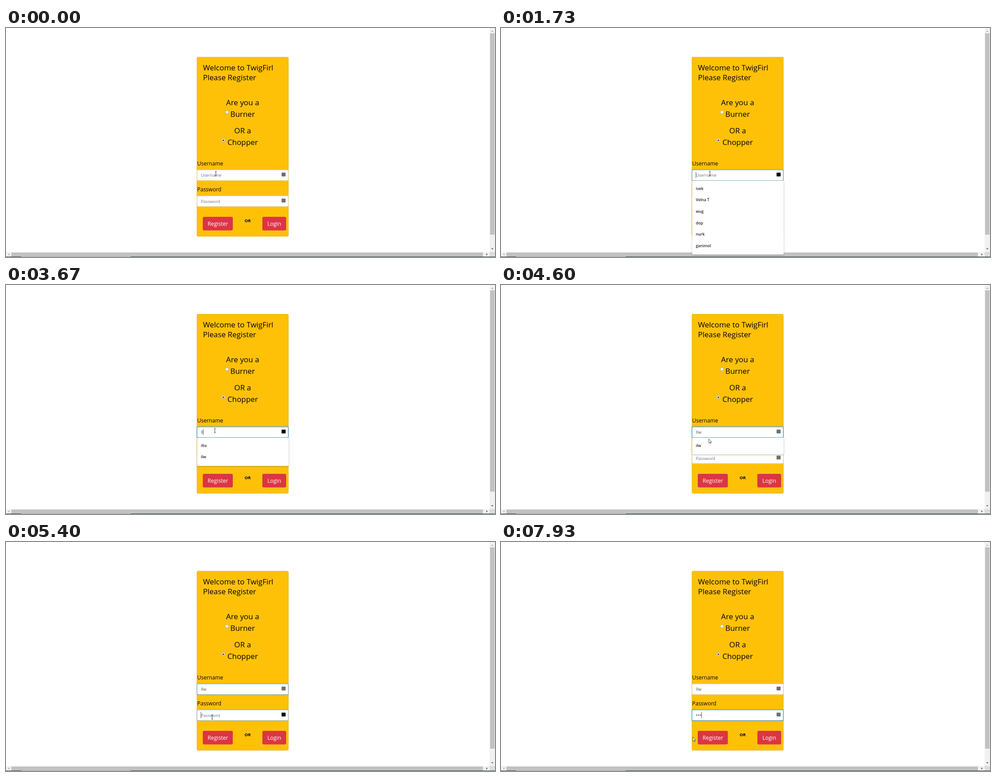
An HTML page for the animation above (8000 ms loop, 1091 by 513 pixels).

```html
<!DOCTYPE html>
<html lang="en">
<head>
<meta charset="utf-8">
<title>Register form</title>
<style>
  html, body { margin: 0; width: 100%; height: 100%; overflow: hidden; background: #fff; }
  svg { display: block; width: 100%; height: 100%; font-family: "Open Sans", "Noto Sans", sans-serif; }
  .big { font-size: 16.85px; }
  .mid { font-size: 12px; }
  .btn { font-size: 12.1px; fill: #fff; }
  .small { font-size: 9.55px; }
  .item { font-size: 8.6px; font-weight: 600; fill: #222; }
  .center { text-anchor: middle; }
</style>
</head>
<body>
<svg viewBox="0 0 1091 513">
  <defs>
    <filter id="shadow" x="-10%" y="-20%" width="120%" height="140%">
      <feDropShadow dx="0" dy="0.8" stdDeviation="0.9" flood-opacity="0.45"/>
    </filter>
    <linearGradient id="radio" x2="0" y2="1">
      <stop stop-color="#fff"/><stop offset="1" stop-color="#dedede"/>
    </linearGradient>
  </defs>

  <!-- scrollbars -->
  <path fill="#f1f1f1" d="M1079 0h12v502h-12zM0 502h1079v10H0z"/>
  <path fill="#dcdcdc" d="M1079 502h12v10h-12z"/>
  <path fill="#c1c1c1" d="M1080 12h10v451h-10zM12 503h1052v9H12z"/>
  <path fill="#a3a3a3" d="M1082.5 8.5h5l-2.5-2.7zM7.5 504.8v5l-2.7-2.5z"/>
  <path fill="#505050" d="M1082.5 493.5h5l-2.5 2.7zM1071.8 504.8v5l2.7-2.5z"/>
  <path fill="#2d4a48" d="M0 512h1091v1H0z"/>
  <path fill="#a9b1b0" d="M34 512h244v1H34z"/>

  <!-- card -->
  <rect x="426" y="65.3" width="204" height="401.4" rx="2.6" fill="#ffc107" stroke="#d9a512" stroke-width=".7"/>
  <g class="big">
    <text x="439.5" y="95.3">Welcome to TwigFirl</text>
    <text x="439.5" y="116.6">Please Register</text>
    <g class="center">
      <text x="528" y="173.3">Are you a</text>
      <text x="528" y="199.4">Burner</text>
      <text x="528" y="235.7">OR a</text>
      <text x="528" y="262">Chopper</text>
    </g>
  </g>
  <g fill="url(#radio)" stroke="#a0a0a0" stroke-width=".7">
    <circle cx="493" cy="189" r="3.7"/>
    <circle cx="485" cy="251.5" r="3.7"/>
  </g>
  <circle cx="485" cy="251.5" r="1.7" fill="#333"/>
  <text class="mid" x="426.5" y="307.7">Username</text>
  <text class="mid" x="426.5" y="365.8">Password</text>
  <g id="fields"></g>

  <g fill="#dc3545">
    <rect x="439" y="423" width="67" height="30.5" rx="3"/>
    <rect x="572" y="423" width="53" height="30.5" rx="3"/>
  </g>
  <text class="btn center" x="472.6" y="442.9">Register</text>
  <text class="btn center" x="598.5" y="442.9">Login</text>
  <text class="small center" x="539.2" y="434.6" font-weight="700">OR</text>

  <g id="menu">
    <rect id="panel" x="426.5" y="342" width="204.3" rx="2" fill="#fff" filter="url(#shadow)"/>
    <g id="items"></g>
  </g>

  <g id="pointer">
    <path id="arrow" d="M0 0V9.2L2.1 7.3L3.6 10.4L4.9 9.8L3.5 6.8H6.3Z" fill="#fff" stroke="#111" stroke-width=".7"/>
    <path id="beam" d="M-1.9-4.9H-.5L0-4.5L.5-4.9H1.9M0-4.5V4.5M-1.9 4.9H-.5L0 4.5L.5 4.9H1.9" fill="none" stroke="#222" stroke-width=".9"/>
  </g>
</svg>
<script>
const LOOP = 8000, FRAME_RATE = 15, TEXT_X = 434.8;
const byId = id => document.getElementById(id);

function add(parent, tag, attributes) {
  const node = document.createElementNS("http://www.w3.org/2000/svg", tag);
  for (const name in attributes) node.setAttribute(name, attributes[name]);
  return parent.appendChild(node);
}

function set(node, attributes) {
  for (const name in attributes) node.setAttribute(name, attributes[name]);
}

const show = (node, visible) => node.style.display = visible ? "" : "none";
const clamp = v => Math.max(0, Math.min(1, v));
const within = (t, from, to) => t >= from && t < to;

// Last entry of [time, value] pairs already reached.
const latest = (steps, t) => steps.filter(step => step[0] <= t).pop()[1];

function makeField(y, placeholder) {
  const group = byId("fields");
  return {
    y, placeholder,
    glow: add(group, "rect", { x: 424.8, y: y - 1.7, width: 206.4, height: 27, rx: 3.6, fill: "#007bff" }),
    box: add(group, "rect", { x: 426.4, y, width: 203.2, height: 23.6, rx: 2.4, fill: "#fff", "stroke-width": .8 }),
    ring: add(group, "rect", { x: 426.4, y, width: 203.2, height: 23.6, rx: 2.4, fill: "none", stroke: "#5aaed6", "stroke-width": 1 }),
    text: add(group, "text", { class: "small", x: TEXT_X, y: y + 15.3 }),
    icon: add(group, "rect", { x: 614.8, y: y + 6, width: 9, height: 8.6, rx: 1 }),
    caret: add(group, "rect", { y: y + 4.4, width: .8, height: 14, fill: "#333" })
  };
}

const username = makeField(318, "Username");
const password = makeField(376.2, "Password");
const items = Array.from({ length: 6 }, (_, i) =>
  add(byId("items"), "text", { class: "item", x: TEXT_X, y: 362.8 + i * 25.6 }));

const userText = [[0, ""], [2870, "I"], [3670, "Il"], [3870, "Ilw"]];
const passText = [[0, ""], [6270, "•"], [6530, "••"], [6870, "•••"]];
const suggestions = [
  [0, []],
  [1730, ["ivek", "Velna T", "wug", "dop", "nurk", "ganimol"]],
  [2930, ["ivek", "ilto", "ilw", "imro", "irvu", "isku"]],
  [3670, ["ilto", "ilw"]],
  [3870, ["ilw"]],
  [5330, []]
];
const path = [
  [0, 468, 327], [400, 482, 250], [600, 478, 265], [870, 467, 300], [930, 467, 306],
  [1000, 467, 306], [1270, 466, 326], [4530, 466, 326], [4730, 460, 377],
  [5070, 460, 392], [7330, 460, 392], [7730, 422, 432], [7930, 428, 437], [8000, 428, 437]
];

function pointerAt(t) {
  const i = path.findIndex(point => point[0] > t);
  const [t0, x0, y0] = path[i - 1], [t1, x1, y1] = path[i];
  const k = (t - t0) / (t1 - t0);
  return [x0 + (x1 - x0) * k, y0 + (y1 - y0) * k];
}

function drawField(field, value, focus, hovered, caretOn) {
  const secret = value.startsWith("•");
  field.text.textContent = value || field.placeholder;
  field.text.style.fontSize = secret ? "11.2px" : "";
  set(field.text, { fill: value ? "#495057" : "#6c757d", y: field.y + (secret ? 16 : 15.3) });
  set(field.glow, { opacity: focus * .38 });
  set(field.box, { stroke: "#ced4da" });
  set(field.ring, { opacity: focus });
  set(field.icon, { fill: hovered ? "#000" : "#6f6f6f" });
  show(field.caret, caretOn);
  set(field.caret, { x: TEXT_X - .3 + (value ? field.text.getComputedTextLength() : 0) });
}

function draw(now) {
  const frame = Math.floor((now % LOOP + 4) * FRAME_RATE / 1000) % (LOOP * FRAME_RATE / 1000);
  const t = frame * 1000 / FRAME_RATE + 4;

  const list = latest(suggestions, t);
  const height = list.length ? 12 + 25.6 * list.length : 0;
  show(byId("menu"), height > 0);
  set(byId("panel"), { height });
  items.forEach((item, i) => item.textContent = list[i] || "");

  const [x, y] = pointerAt(t);
  const overUser = within(y, 318, 342);
  const overPass = within(y, 380, 400) && x > 427;
  set(byId("pointer"), { transform: `translate(${x} ${y})` });
  show(byId("beam"), overUser || overPass);
  show(byId("arrow"), !overUser && !overPass);

  const userFocus = clamp((t - 1630) / 150) - clamp((t - 5345) / 150);
  const passFocus = clamp((t - 5345) / 150);
  const userCaret = within(t, 1670, 2200) || within(t, 2730, 3400) ||
                    within(t, 3670, 4330) || within(t, 4860, 5330);
  const passCaret = within(t, 5330, 5870) || within(t, 6270, 7400) || t >= 7930;
  drawField(username, latest(userText, t), userFocus, overUser && t > 1000, userCaret);
  drawField(password, latest(passText, t), passFocus, overPass, passCaret);
}

const start = performance.now();
function tick() {
  draw(performance.now() - start);
  requestAnimationFrame(tick);
}
tick();
</script>
</body>
</html>
```
